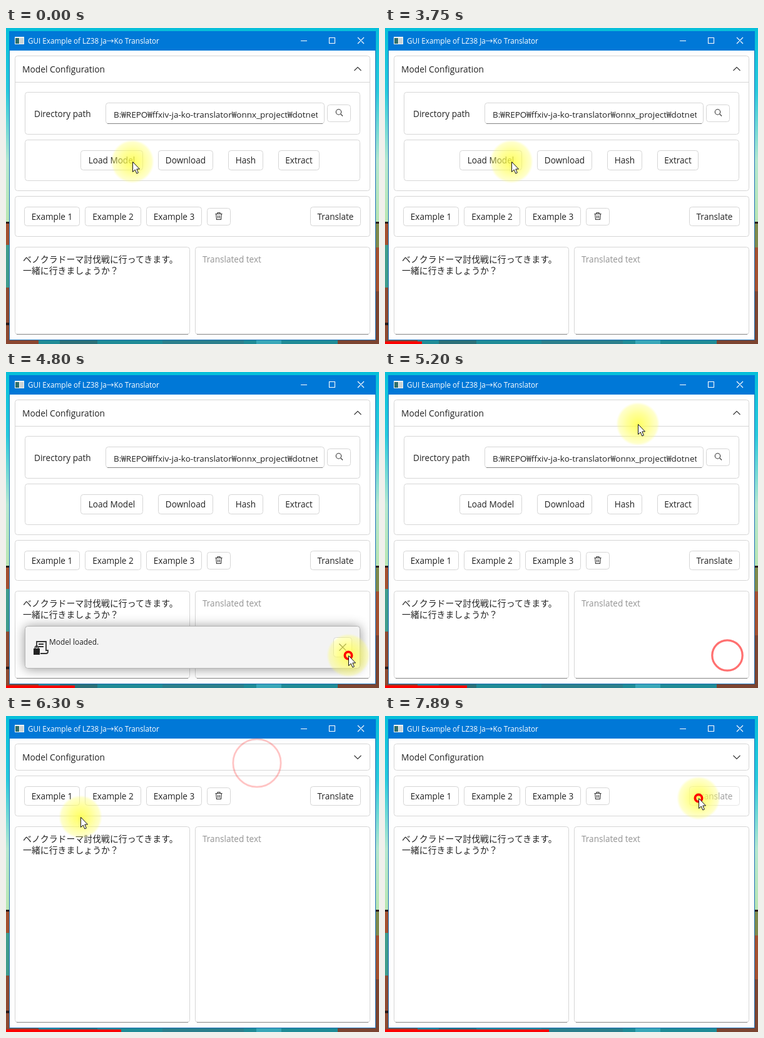
These frames come from a looping animation (596 by 504 pixels, 7.99 s). An HTML page:

```html
<!DOCTYPE html>
<html lang="en">
<head>
<meta charset="utf-8">
<style>
  html, body { margin: 0; width: 100%; height: 100%; overflow: hidden; }
  svg { display: block; width: 596px; height: 504px; }
  text { font: 13.6px "Open Sans", "Noto Sans CJK JP", "Noto Sans CJK KR", "Noto Sans CJK", sans-serif; fill: #222; white-space: pre; }
  .box { fill: #fff; stroke: #d6d6d6; }
  .mid { text-anchor: middle; }
  .icon { fill: none; stroke: #333; stroke-width: 1.1; }
</style>
</head>
<body>
<svg id="stage" viewBox="0 0 596 504"></svg>
<script>
const LOOP = 7990;
const $ = id => document.getElementById(id);

const rect = (x, y, w, h, fill) => `<rect x="${x}" y="${y}" width="${w}" height="${h}" fill="${fill}"/>`;
const box = (x, y, x2, y2, id = "") =>
  `<rect class="box" id="${id}" x="${x + .5}" y="${y + .5}" width="${x2 - x - 1}" height="${y2 - y - 1}" rx="4"/>`;
const text = (x, y, s, attrs = "") => `<text x="${x}" y="${y}" ${attrs}>${s}</text>`;
const line = (d, attrs = "") => `<path class="icon" d="${d}" ${attrs}/>`;
const button = (x, x2, y, h, label, id = "") =>
  box(x, y, x2, y + h, id && id + "Box") + text((x + x2) / 2, y + h / 2 + 5, label, `class="mid" id="${id}"`);
const underline = (x, x2, y) => line(`M${x + 3} ${y}H${x2 - 3}`, 'style="stroke:#858585"');

const wallpaper =
  rect(0, 0, 596, 504, "url(#sky)") +
  rect(0, 310, 6, 40, "#a4502f") + rect(0, 309, 6, 3, "#2a1a18") + rect(0, 346, 6, 70, "#3f9c8c") +
  rect(0, 414, 6, 90, "#8f4a30") + rect(0, 470, 6, 4, "#2a1a18") +
  rect(590, 310, 6, 40, "#7f8a4c") + rect(590, 309, 6, 3, "#2a1a18") + rect(590, 350, 6, 70, "#a4502f") +
  rect(590, 420, 6, 84, "#7c4430") +
  rect(0, 497, 596, 7, "#1f8b96") + rect(0, 497, 52, 7, "#8a4630") + rect(86, 497, 60, 7, "#2b7078") +
  rect(250, 497, 130, 7, "#2b7f8c") + rect(400, 497, 40, 7, "#38a7b8") + rect(530, 497, 66, 7, "#7c4430");

const titleBar =
  rect(5, 5, 586, 493, "#1a6fb5") + rect(6, 36, 584, 461, "#fefefe") + rect(5, 5, 586, 31, "#0078d7") +
  rect(14, 14, 15, 12, "#f4f4f4") + rect(15, 16, 6, 9, "#2f6f6a") + rect(22, 16, 6, 9, "#c9d3d6") +
  text(35, 25, "GUI Example of LZ38 Ja→Ko Translator", 'style="font-size:11.7px;fill:#fff"') +
  line("M471 20.5H481M516.5 15.5H525.5V24.5H516.5ZM562 15L572 25M572 15L562 25", 'style="stroke:#fff"');

const settings =
  box(30, 102, 566, 170) + text(45, 142, "Directory path") +
  box(159, 119, 509, 153) + underline(159, 509, 152.5) +
  `<g clip-path="url(#field)">${text(172, 143, "B:₩REPO₩ffxiv-ja-ko-translator₩onnx_project₩dotnet", 'style="font-size:13.5px"')}</g>` +
  box(513, 122, 551, 150) + line("M534.8 137.2L538 140.5") + '<circle class="icon" cx="531.5" cy="134" r="4.2"/>' +
  box(30, 178, 566, 244) +
  button(119, 219, 195, 32, "Load Model", "load") + button(243, 331, 195, 32, "Download") +
  button(355, 411, 195, 32, "Hash") + button(435, 501, 195, 32, "Extract");

const lower =
  box(14, 268, 582, 333) +
  button(29, 118, 285, 31, "Example 1", "example") + button(126, 216, 285, 31, "Example 2") +
  button(224, 313, 285, 31, "Example 3") + box(321, 287, 359, 315) +
  line("M334.5 296.5H345.5M338 296V294.5H342V296M335.7 297L336.5 305.5H343.5L344.3 297M338.7 299V303.5M341.3 299V303.5") +
  button(486, 567, 285, 31, "Translate", "translate") +
  box(14, 349, 294, 489, "input") + box(302, 349, 582, 489, "output") +
  text(27, 374, "ベノクラドーマ討伐戦に行ってきます。", 'style="font-size:13.9px"') +
  text(27, 392, "一緒に行きましょうか？", 'style="font-size:13.9px"') +
  text(314, 374, "Translated text", 'style="fill:#949494"');

const toast =
  '<rect x="30.5" y="405.5" width="535" height="67" rx="4" fill="#f3f3f3" stroke="#b5b5b5" filter="url(#shadow)"/>' +
  line("M49 440V430H64V444H67V446Q67 449 64 449H55M52 434H60M52 438H60", 'style="stroke-width:1.8"') +
  rect(44, 441, 10, 10, "#222") + line("M46.5 441V438.5Q49 435 51.5 438.5V441", 'style="stroke-width:1.6"') +
  text(69, 435, "Model loaded.", 'style="font-size:11.9px"') +
  box(523, 423, 553, 455) + line("M532.5 433.5L543.5 444.5M543.5 433.5L532.5 444.5");

$("stage").innerHTML = `
  <defs>
    <linearGradient id="sky" x2="0" y2="1">
      <stop stop-color="#06bfd9"/><stop offset=".2" stop-color="#27c9dc"/>
      <stop offset=".42" stop-color="#b4e8cf"/><stop offset=".6" stop-color="#b9e6b4"/>
    </linearGradient>
    <radialGradient id="glow">
      <stop stop-color="#ff4" stop-opacity=".85"/><stop offset=".5" stop-color="#ff5" stop-opacity=".6"/>
      <stop offset=".88" stop-color="#ff6" stop-opacity=".34"/><stop offset="1" stop-color="#ff8" stop-opacity="0"/>
    </radialGradient>
    <filter id="shadow" x="-10%" y="-60%" width="120%" height="220%">
      <feDropShadow dx="0" dy="1" stdDeviation="9" flood-opacity=".42"/>
    </filter>
    <clipPath id="field"><rect x="160" y="120" width="338" height="32"/></clipPath>
    <clipPath id="panel"><rect x="14" y="87" width="568" height="172"/></clipPath>
    <clipPath id="body"><rect x="6" y="36" width="584" height="461"/></clipPath>
  </defs>
  ${wallpaper}${titleBar}
  ${box(14, 44, 582, 260, "card")}
  <g clip-path="url(#panel)"><g id="settings">${settings}</g></g>
  <path id="divider" d="M15 86.5H581" stroke="#d6d6d6"/>
  ${text(26, 71, "Model Configuration", 'style="font-size:13.8px"')}
  ${line("M556.5 68L562 62.5L567.5 68", 'id="chevron"')}
  <g id="lower">${lower}</g>
  ${underline(14, 294, 488.5)}${underline(302, 582, 488.5)}
  <g clip-path="url(#body)"><g id="toast">${toast}</g></g>
  <rect id="bar" y="500" height="4" fill="#f00"/>
  <g id="pointer"><circle r="35" fill="url(#glow)"/></g>
  <circle id="ring" fill="none" stroke="#f00"/>
  <path id="arrow" d="M.5 .5V16.5L4.2 13L6.8 19L9.4 17.9L6.8 12H11.5Z" fill="#fff" stroke="#111"/>`;

const clamp = v => Math.max(0, Math.min(1, v));
const ramp = (t, a, b) => clamp((t - a) / (b - a));
const eases = {
  line: u => u,
  in: u => u ** 1.5,
  out: u => 1 - (1 - u) ** 2,
  both: u => u * u * (3 - 2 * u)
};

// [time, values..., ease used to arrive]
const track = (keys, t) => {
  let i = keys.findIndex(k => k[0] > t);
  if (i < 0) return keys[keys.length - 1].slice(1, -1);
  if (i === 0) return keys[0].slice(1, -1);
  const a = keys[i - 1], b = keys[i];
  const u = eases[b[b.length - 1]](ramp(t, a[0], b[0]));
  return b.slice(1, -1).map((v, j) => a[j + 1] + (v - a[j + 1]) * u);
};

const path = [
  [0, 202, 213, "line"], [3900, 202, 213, "line"], [4300, 360, 344, "in"], [4600, 547, 452, "out"],
  [4800, 547, 452, "line"], [5200, 404, 83, "both"], [5400, 401, 75, "out"], [5700, 401, 75, "line"],
  [6300, 119, 161, "both"], [6600, 93, 129, "out"], [6890, 93, 129, "line"], [7490, 501, 131, "both"]
];
const progress = [
  [600, 0, "line"], [1500, 53, "line"], [3750, 59, "line"], [4300, 83, "line"],
  [5200, 131, "line"], [6300, 184, "line"], [7890, 262, "line"]
];
const clicks = [[700, 202, 213], [4800, 547, 452], [5600, 401, 75], [6890, 93, 129], [7890, 501, 131]];

const snap = t => {
  if (t < 600) return 0;
  if (t < 1600) return Math.floor(t / 100) * 100;
  if (t < 3750) return 1500;
  if (t < 3900) return 3750;
  if (t < 6700) return Math.floor(t / 100) * 100;
  if (t < 6790) return 6600;
  return Math.floor((t - 90) / 100) * 100 + 90;
};

const setButton = (id, pressed, disabled) => {
  $(id).style.fill = disabled ? "#9c9c9c" : pressed ? "#707070" : "#222";
  $(id + "Box").style.stroke = disabled ? "#e6e6e6" : "#d6d6d6";
};

function draw(t) {
  const closing = ramp(t, 5600, 5800);
  const closed = t >= 5800;
  $("card").setAttribute("height", closed ? 42 : 215);
  $("divider").style.display = closed ? "none" : "";
  $("settings").style.display = closed ? "none" : "";
  $("settings").setAttribute("transform", `translate(0 ${-173 * eases.both(closing)})`);
  $("chevron").setAttribute("transform", `rotate(${180 * closing} 562 65.5)`);
  $("lower").setAttribute("transform", `translate(0 ${closed ? -173 : 0})`);
  for (const id of ["input", "output"]) $(id).setAttribute("height", closed ? 312 : 139);

  setButton("load", t === 600, t >= 700 && t < 3750);
  setButton("example", t === 6790, false);
  setButton("translate", t === 7790, t >= 7890);

  const shown = ramp(t, 3800, 4200);
  $("toast").setAttribute("opacity", shown * (1 - ramp(t, 4800, 5100)));
  $("toast").setAttribute("transform", `translate(0 ${40 * (1 - eases.out(shown))})`);
  $("bar").setAttribute("width", Math.round(track(progress, t)[0]));

  const [x, y] = track(path, t);
  $("pointer").setAttribute("transform", `translate(${x} ${y})`);
  $("arrow").setAttribute("transform", `translate(${x} ${y})`);

  const click = clicks.find(c => t >= c[0] && t < c[0] + 800);
  const ring = $("ring");
  ring.style.display = click ? "" : "none";
  if (click) {
    const k = (t - click[0]) / 100;
    ring.setAttribute("cx", click[1]);
    ring.setAttribute("cy", click[2]);
    ring.setAttribute("r", 5.6 + 4.65 * k);
    ring.setAttribute("stroke-width", 3.8 - .14 * k);
    ring.setAttribute("opacity", 1 - .11 * k);
  }
}

const start = performance.now();
function tick() {
  draw(snap((performance.now() - start) % LOOP));
  requestAnimationFrame(tick);
}
tick();
</script>
</body>
</html>
```
